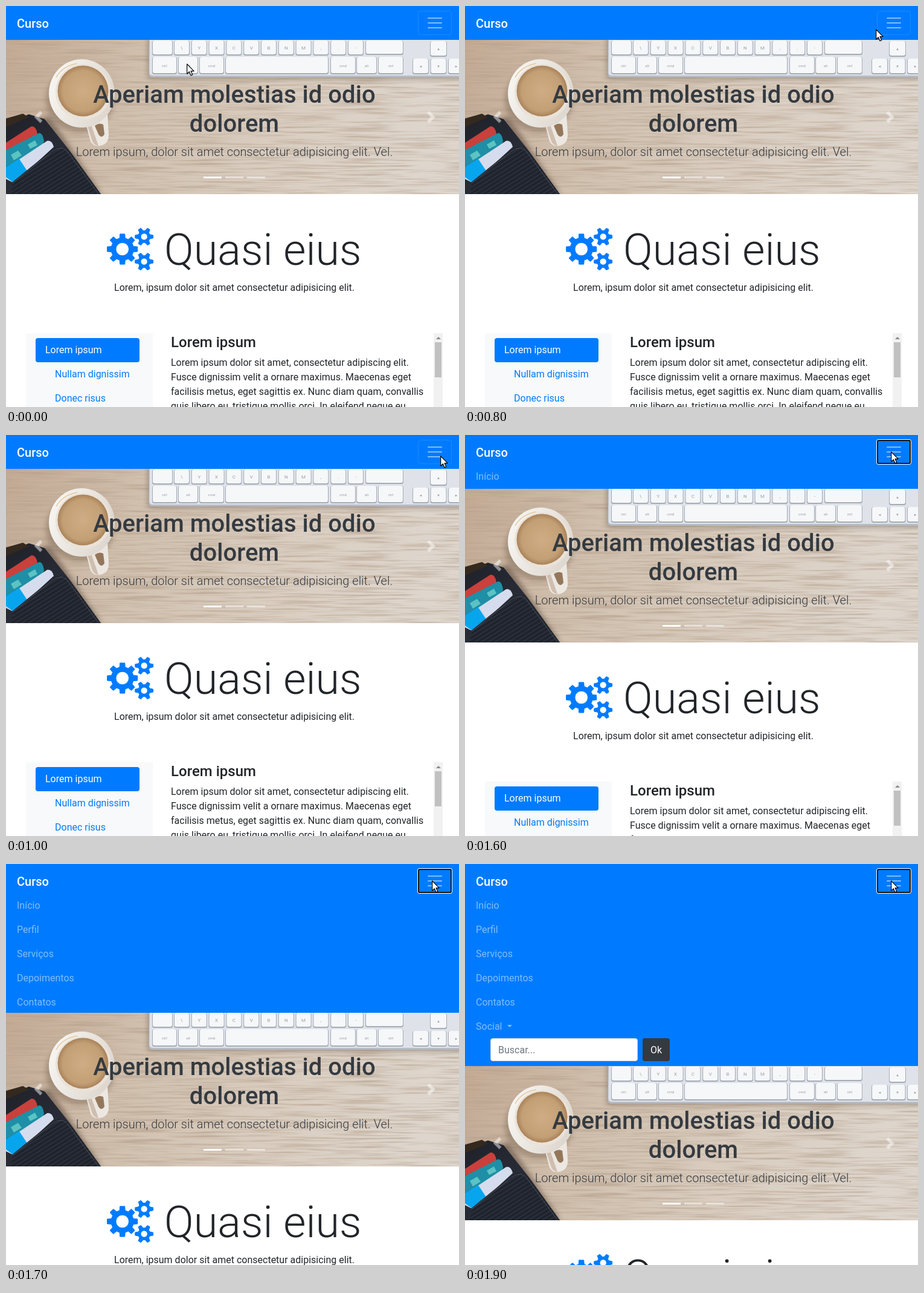
Write an HTML page that moves like this. It is 750 px wide and 663 px high and loops after 8000 ms.

```html
<!DOCTYPE html>
<html lang="pt">
<head>
<meta charset="utf-8">
<title>Curso</title>
<style>
  html, body { margin: 0; width: 100%; height: 100%; overflow: hidden; background: #fff; }
  body { position: relative; font: 400 16px/24px Roboto, sans-serif; color: #212529; }
  #stage { position: absolute; left: 0; top: 0; width: 750px; height: 663px; overflow: hidden; background: #fff; }
  #stage div, #stage svg.abs { position: absolute; white-space: nowrap; }
  .mid { left: 2px; width: 752px; text-align: center; }

  .nav { left: 0; top: 0; width: 750px; height: 56px; background: #007bff; animation: nav 8s step-end infinite; }
  .menu { left: 0; top: 48px; width: 750px; height: 0; overflow: hidden; color: rgba(255,255,255,.5); animation: menu 8s step-end infinite; }
  .menu .link { left: 18px; }
  .brand { left: 18px; top: 14px; font-size: 20px; font-weight: 500; line-height: 30px; color: #fff; }
  .caret { left: 69.5px; top: 218px; border: 4.8px solid transparent; border-top-color: rgba(255,255,255,.5); border-bottom: 0; }
  .field { left: 42px; top: 240px; width: 230px; height: 36px; padding-left: 12px; border: 1px solid #ced4da; border-radius: 4px; background: #fff; color: #6c757d; line-height: 37px; }
  .ok { left: 294px; top: 240px; width: 45px; height: 38px; border-radius: 4px; background: #343a40; color: #fff; line-height: 39px; text-align: center; }
  .toggle { left: 682px; top: 8px; width: 54px; height: 38px; border: 1px solid rgba(255,255,255,.1); border-radius: 4px; }
  .ring { left: 682px; top: 8px; width: 52px; height: 36px; border: 2px solid #101010; border-radius: 3px; box-shadow: 0 0 0 1px #fff; opacity: 0; animation: ring 8s step-end infinite; }

  .page { left: 0; top: 0; width: 750px; height: 1000px; animation: page 8s step-end infinite; }
  .caption { color: #343a40; }
  .title { top: 123px; font-size: 40px; font-weight: 500; line-height: 48px; }
  .lead { top: 226px; font-size: 20px; font-weight: 300; line-height: 30px; }
  .dot { top: 282px; width: 30px; height: 3px; background: #fff; opacity: .5; }
  .display { top: 361px; font-size: 72px; font-weight: 300; line-height: 86px; }
  .display svg { width: 77.14px; height: 72px; vertical-align: -10.3px; }
  .side { left: 33px; top: 541px; width: 210px; height: 400px; background: #f8f9fa; color: #007bff; }
  .pill { left: 16px; top: 8px; width: 156px; height: 40px; padding-left: 16px; line-height: 40px; border-radius: 4px; background: #007bff; color: #fff; }
  .h4 { left: 273px; top: 541.5px; font-size: 24px; font-weight: 500; line-height: 28.8px; }
  .text { left: 273px; top: 577.8px; }
  .track { left: 708px; top: 541px; width: 15px; height: 400px; background: #f1f1f1; }
  .thumb { left: 2px; top: 15px; width: 11px; height: 58px; background: #c1c1c1; }
  .up { left: 4px; top: 6px; border: 4px solid transparent; border-top: 0; border-bottom-color: #8a8a8a; }
  .cursor { left: 299px; top: 95px; width: 16px; height: 24px; animation: cursor 8s step-end infinite; }

  @keyframes nav {
    0% { height: 56px } 20% { height: 89px } 21.25% { height: 246px }
    22.5% { height: 326px } 23.75%, 100% { height: 334px }
  }
  @keyframes menu {
    0% { height: 0 } 20% { height: 33px } 21.25% { height: 190px }
    22.5% { height: 270px } 23.75%, 100% { height: 278px }
  }
  @keyframes page {
    0% { top: 0 } 20% { top: 32px } 21.25% { top: 189px }
    22.5% { top: 270px } 23.75%, 100% { top: 278px }
  }
  @keyframes ring { 0% { opacity: 0 } 16.25%, 100% { opacity: 1 } }
  @keyframes cursor {
    0% { left: 299px; top: 95px }
    1.25% { left: 356px; top: 110px }
    2.5% { left: 335px; top: 82px }
    7.5% { left: 436px; top: 101px }
    8.75% { left: 585px; top: 72px }
    10% { left: 680px; top: 38px }
    11.25% { left: 738px; top: 42px }
    12.5% { left: 719px; top: 34px }
    13.75%, 100% { left: 705px; top: 27px }
  }
</style>
</head>
<body>
<div id="stage">
  <div class="page">
    <svg class="abs" style="left:0;top:56px" width="750" height="255" viewBox="0 56 750 255">
      <defs>
        <linearGradient id="wood" x2="1" y2=".12">
          <stop offset="0" stop-color="#c3aa94"/>
          <stop offset=".3" stop-color="#d0bfad"/>
          <stop offset=".65" stop-color="#d9cdc0"/>
          <stop offset="1" stop-color="#ded6cd"/>
        </linearGradient>
        <linearGradient id="mug" x2="1" y2=".4">
          <stop offset="0" stop-color="#fbf9f6"/>
          <stop offset="1" stop-color="#ded8d0"/>
        </linearGradient>
        <radialGradient id="coffee">
          <stop offset="0" stop-color="#cfad84"/>
          <stop offset=".8" stop-color="#c39f75"/>
          <stop offset="1" stop-color="#a98259"/>
        </radialGradient>
        <linearGradient id="leather" x2="1" y2="1">
          <stop offset="0" stop-color="#1f2128"/>
          <stop offset=".5" stop-color="#282c37"/>
          <stop offset="1" stop-color="#15181f"/>
        </linearGradient>
        <pattern id="weave" width="6" height="6" patternUnits="userSpaceOnUse" patternTransform="rotate(-32)">
          <path d="M0 1.5H6" stroke="#3d4452" stroke-width="1.4" opacity=".55"/>
        </pattern>
        <filter id="grain" x="0" y="0" width="1" height="1">
          <feTurbulence type="fractalNoise" baseFrequency=".011 .3" numOctaves="3" seed="4"/>
          <feColorMatrix values="0 0 0 0 .45  0 0 0 0 .34  0 0 0 0 .25  1.6 0 0 0 -.68"/>
        </filter>
        <filter id="soft" x="-.3" y="-.3" width="1.6" height="1.6"><feGaussianBlur stdDeviation="4"/></filter>
      </defs>
      <rect y="56" width="750" height="255" fill="url(#wood)"/>
      <rect y="56" width="750" height="255" filter="url(#grain)"/>

      <rect x="234" y="50" width="540" height="71" rx="6" fill="#6d5a4a" opacity=".45" filter="url(#soft)"/>
      <path d="M237 50H760V118H243Q236 118 236.5 111Z" fill="#b7bcc5"/>
      <path d="M238 50H760V115H243Q237 115 237.5 108Z" fill="#dfe3e9"/>
      <g id="keys" font-family="Roboto, sans-serif" fill="#9a9fa8" text-anchor="middle"></g>

      <ellipse cx="122" cy="155" rx="56" ry="54" fill="#5d4836" opacity=".35" filter="url(#soft)"/>
      <path d="M131 190L140 224Q145 233 156 231Q171 228 170 211L168 176Z" fill="#ece7e1"/>
      <path d="M147 198Q154 192 161 196L163 212Q158 220 153 212Z" fill="#94775b"/>
      <path d="M134 196L143 224Q147 231 153 231L141 196Z" fill="#a58365" opacity=".4"/>
      <ellipse cx="125.500" cy="144.500" rx="54.500" ry="56.500" fill="url(#mug)"/>
      <ellipse cx="128" cy="142" rx="46" ry="46" fill="#eae2d8"/>
      <ellipse cx="127.500" cy="140.500" rx="42" ry="42" fill="url(#coffee)"/>
      <path d="M83 118Q94 99 118 95" fill="none" stroke="#d8b273" stroke-width="1.5" opacity=".6"/>

      <path d="M0 205L72 182L158 311H0Z" fill="#463629" opacity=".5" filter="url(#soft)"/>
      <path d="M0 194L38 179L64 187L106 240L157 311H0Z" fill="url(#leather)"/>
      <path d="M0 186L28 178L38 184L0 200Z" fill="#34291f"/>
      <path d="M0 226L42 199Q48 198 51 207L53 216L0 244Z" fill="#c9403c"/>
      <path d="M0 238L55 210Q61 210 63 224L58 234L0 266Z" fill="#1e8fa6"/>
      <path d="M8 246l12-7 6 8-13 8ZM36 229l12-7 4 8-12 6Z" fill="#5cc3c4"/>
      <path d="M0 268L68 223Q76 221 79 233L30 278L10 291L0 286Z" fill="#d5dced"/>
      <path d="M0 266L22 253L36 274L11 291L0 283Z" fill="#08a5ef"/>
      <path d="M8 311L12 290L76 238Q94 226 104 240L157 311Z" fill="#1f232c"/>
      <path d="M8 311L12 290L76 238Q94 226 104 240L157 311Z" fill="url(#weave)"/>
      <path d="M11 293L77 240Q93 229 102 241L152 309" fill="none" stroke="#4a505d"/>

      <g fill="#fff" opacity=".5">
        <path transform="translate(43.5 173.5) scale(2.5)" d="M5.25 0l-4 4 4 4 1.5-1.5-2.5-2.5 2.5-2.5z"/>
        <path transform="translate(694 173.5) scale(2.5)" d="M2.75 0l-1.5 1.5 2.5 2.5-2.5 2.5 1.5 1.5 4-4z"/>
      </g>
    </svg>
    <div class="mid caption title">Aperiam molestias id odio<br>dolorem</div>
    <div class="mid caption lead">Lorem ipsum, dolor sit amet consectetur adipisicing elit. Vel.</div>
    <div class="dot" style="left:327px;opacity:1"></div>
    <div class="dot" style="left:363px"></div>
    <div class="dot" style="left:399px"></div>

    <div class="mid display"><svg viewBox="0 0 77.14 72"><path id="gears" fill="#007bff" stroke="#007bff" stroke-linejoin="round"/></svg> Quasi eius</div>
    <div class="mid" style="top:453.5px">Lorem, ipsum dolor sit amet consectetur adipisicing elit.</div>

    <div class="side">
      <div class="pill">Lorem ipsum</div>
      <div style="left:48px;top:56px">Nullam dignissim</div>
      <div style="left:48px;top:96px">Donec risus</div>
    </div>
    <div class="h4">Lorem ipsum</div>
    <div class="text">Lorem ipsum dolor sit amet, consectetur adipiscing elit.<br>Fusce dignissim velit a ornare maximus. Maecenas eget<br>facilisis metus, eget sagittis ex. Nunc diam quam, convallis<br>quis libero eu, tristique mollis orci. In eleifend neque eu</div>
    <div class="track"><div class="up"></div><div class="thumb"></div></div>
  </div>

  <div class="nav"></div>
  <div class="brand">Curso</div>
  <div class="menu">
    <div class="link" style="top:9px">Início</div>
    <div class="link" style="top:49px">Perfil</div>
    <div class="link" style="top:89px">Serviços</div>
    <div class="link" style="top:129px">Depoimentos</div>
    <div class="link" style="top:169px">Contatos</div>
    <div class="link" style="top:209px">Social</div>
    <div class="caret"></div>
    <div class="field">Buscar...</div>
    <div class="ok">Ok</div>
  </div>
  <div class="toggle"></div>
  <div class="ring"></div>
  <svg class="abs" style="left:695px;top:13px" width="30" height="30">
    <path d="M4 7h22M4 15h22M4 23h22" stroke="#fff" stroke-opacity=".5" stroke-width="2" stroke-linecap="round"/>
  </svg>
  <div class="cursor">
    <svg width="16" height="24" style="display:block">
      <path d="M.7 .9V17.2L4.4 13.7L7 19.8L9.7 18.6L7.1 12.6H12.1Z" fill="#fff" stroke="#000" stroke-width="1.2" stroke-linejoin="round"/>
    </svg>
  </div>
</div>
<script>
  // One gear with a round hole: tip and root are half-angles in degrees.
  function gear(cx, cy, r, hole, teeth, tip, root, depth) {
    const at = (deg, rad) => {
      const a = deg * Math.PI / 180;
      return (cx + rad * Math.cos(a)).toFixed(2) + ' ' + (cy + rad * Math.sin(a)).toFixed(2);
    };
    const pts = [];
    for (let i = 0; i < teeth; i++) {
      const a = i * 360 / teeth;
      pts.push(at(a - root, r * depth), at(a - tip, r), at(a + tip, r), at(a + root, r * depth));
    }
    return `M${pts.join('L')}ZM${cx - hole} ${cy}a${hole} ${hole} 0 1 0 ${2 * hole} 0a${hole} ${hole} 0 1 0 ${-2 * hole} 0Z`;
  }
  document.getElementById('gears').setAttribute('d',
    gear(25.7, 36, 25.4, 10.8, 8, 9, 14, .74) +
    gear(61.7, 15.4, 15.1, 5.6, 6, 9, 21, .66) +
    gear(61.7, 56.6, 15.1, 5.6, 6, 9, 21, .66));

  function key(x, y, w, h, label = '', size = 8) {
    return `<rect x="${x - 1}" y="${y}" width="${w + 2}" height="${h + 2}" rx="3.5" fill="#a6acb6"/>` +
      `<rect x="${x}" y="${y}" width="${w}" height="${h}" rx="3" fill="#f5f7f9"/>` +
      `<text x="${x + w / 2}" y="${y + h / 2 + 3}" font-size="${size}">${label}</text>`;
  }
  let keys = key(243, 57, 32, 23);
  [...'\\YXCVBNM,.-'].forEach((c, i) => keys += key(279 + i * 28.8, 57, 24, 23, c));
  keys += key(596, 57, 61, 22);
  [[243, 39, 'ctrl'], [286, 31, 'alt'], [321, 39, 'cmd'], [364, 169, ''], [538, 40, 'cmd'], [581, 32, 'alt'], [617, 40, 'ctrl']]
    .forEach(([x, w, s]) => keys += key(x, 84, w, 27, s, 6));
  keys += key(703, 58, 26, 24, '▴', 7);
  ['◂', '▾', '▸'].forEach((s, i) => keys += key(674 + i * 29.5, 87, 25, 24, s, 7));
  document.getElementById('keys').innerHTML = keys;
</script>
</body>
</html>
```
